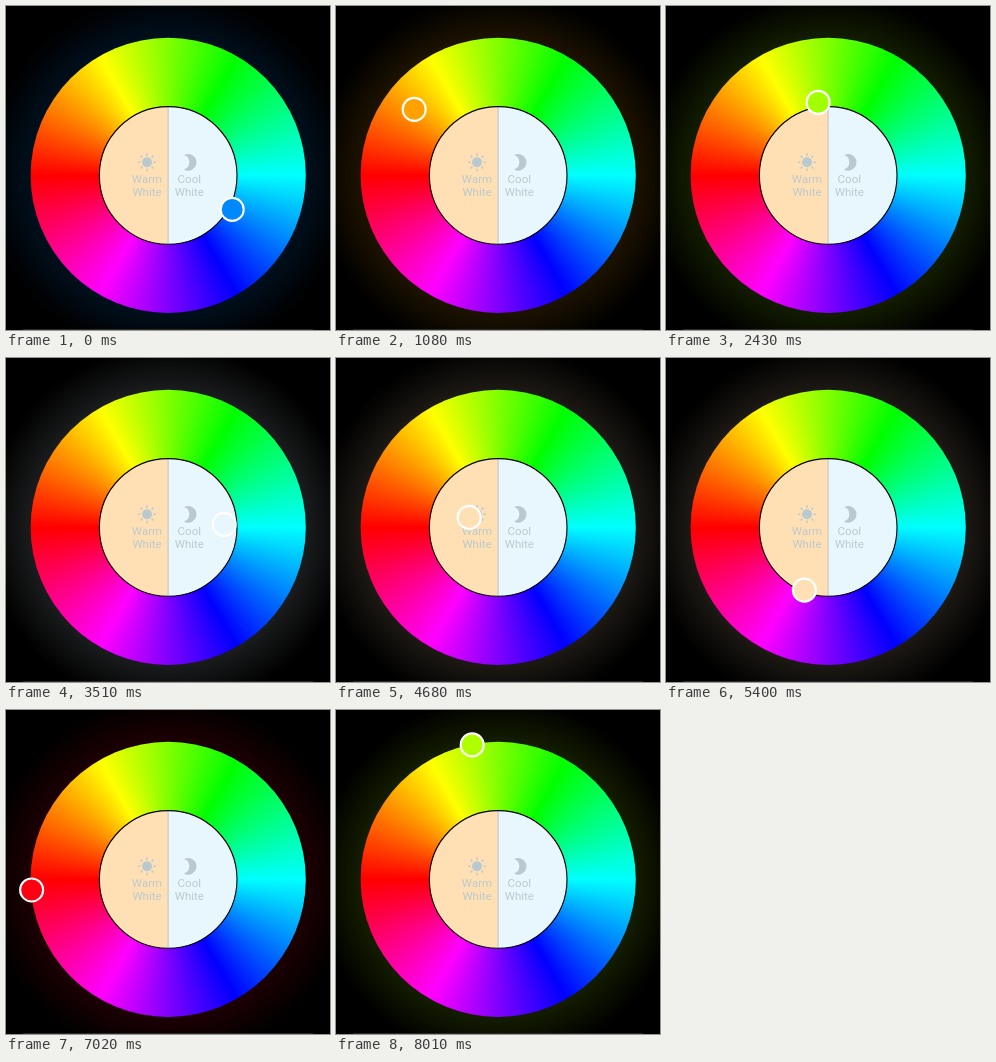
An HTML page with a canvas that plays this animation: 324 by 324 pixels, repeating every 8.1 s.

```html
<!DOCTYPE html>
<html lang="en">
<head>
<meta charset="utf-8">
<title>Colour wheel</title>
<style>
  html, body { margin: 0; width: 100%; height: 100%; overflow: hidden; background: #000; }
  canvas { display: block; width: 324px; height: 324px; }
</style>
</head>
<body>
<canvas id="stage"></canvas>
<script>
const SIZE = 324, LOOP = 8100, STEP = 90;
const CX = 162.2, CY = 169.4, OUTER = 137.6, INNER = 68.8;
const WARM = '#ffe0b4', COOL = '#e8f6fe', INK = '#bac9cf';

// Handle path: time, then offset from the wheel's centre.
const path = [
  [0, 64, 34], [360, 10, 95], [720, -85, 45], [1080, -84, -66],
  [1800, -50, -100], [2430, -10, -73], [2970, 42, -52], [3510, 56, -3],
  [4680, -29, -10], [6120, -22, 135.3], [6592, -104, 90], [7065, -137, 2],
  [7537, -106, -87], [8010, -26, -134.5]
];

const canvas = document.getElementById('stage');
const ctx = canvas.getContext('2d');
const ratio = window.devicePixelRatio || 1;
canvas.width = canvas.height = Math.round(SIZE * ratio);
ctx.scale(ratio, ratio);

function slope(i, axis) {
  const a = path[Math.max(i - 1, 0)], b = path[Math.min(i + 1, path.length - 1)];
  return (b[axis] - a[axis]) / (b[0] - a[0]);
}

function handleAt(time) {
  let i = 0;
  while (i < path.length - 2 && time >= path[i + 1][0]) i++;
  const a = path[i], b = path[i + 1];
  const span = b[0] - a[0], u = (time - a[0]) / span;
  const u2 = u * u, u3 = u2 * u;
  const [x, y] = [1, 2].map(k =>
    (2 * u3 - 3 * u2 + 1) * a[k] + (u3 - 2 * u2 + u) * span * slope(i, k) +
    (3 * u2 - 2 * u3) * b[k] + (u3 - u2) * span * slope(i + 1, k));
  const limit = Math.min(1, OUTER / Math.hypot(x, y));
  return { x: x * limit, y: y * limit };
}

function colourAt({ x, y }) {
  if (Math.hypot(x, y) < INNER) return x < 0 ? WARM : COOL;
  return `hsl(${180 + Math.atan2(y, x) * 180 / Math.PI}, 100%, 50%)`;
}

function disc(x, y, r, fill, from = 0, to = Math.PI * 2) {
  ctx.beginPath();
  ctx.arc(x, y, r, from, to);
  ctx.fillStyle = fill;
  ctx.fill();
}

function drawGlow(colour) {
  const fade = ctx.createRadialGradient(CX, CY, OUTER - 4, CX, CY, 182);
  fade.addColorStop(0, 'rgba(0,0,0,0.88)');
  fade.addColorStop(1, '#000');
  ctx.fillStyle = colour;
  ctx.fillRect(0, 0, SIZE, SIZE);
  ctx.fillStyle = fade;
  ctx.fillRect(0, 0, SIZE, SIZE);
  ctx.fillStyle = '#2c2a2a';
  ctx.fillRect(17, 323, 290, 1);
}

function drawWheel() {
  const hues = ctx.createConicGradient(0, CX, CY);
  for (let i = 0; i <= 6; i++) hues.addColorStop(i / 6, `hsl(${180 + i * 60}, 100%, 50%)`);
  disc(CX, CY, OUTER, hues);
  disc(CX, CY, INNER, COOL);
  disc(CX, CY, INNER, WARM, Math.PI / 2, Math.PI * 1.5);
  ctx.fillStyle = '#bcc3c6';
  ctx.fillRect(161.6, CY - INNER, 1, INNER * 2);
  ctx.beginPath();
  ctx.arc(CX, CY, INNER, 0, Math.PI * 2);
  ctx.lineWidth = 1.1;
  ctx.strokeStyle = '#000';
  ctx.stroke();
}

function drawSun(x, y) {
  disc(x, y, 5, INK);
  ctx.strokeStyle = INK;
  ctx.lineWidth = 1.6;
  ctx.beginPath();
  for (let i = 0; i < 8; i++) {
    const c = Math.cos(i * Math.PI / 4), s = Math.sin(i * Math.PI / 4);
    ctx.moveTo(x + c * 6.5, y + s * 6.5);
    ctx.lineTo(x + c * 8.9, y + s * 8.9);
  }
  ctx.stroke();
}

function drawMoon(x, y) {
  const outer = Math.atan2(7.2, -4.2), inner = Math.atan2(7.2, 2.1);
  ctx.beginPath();
  ctx.arc(x, y, 8.3, -outer, outer);
  ctx.arc(x - 6.3, y, 7.5, inner, -inner, true);
  ctx.fillStyle = INK;
  ctx.fill();
}

function drawLabel(word, x) {
  ctx.font = '11.5px Roboto, sans-serif';
  ctx.textAlign = 'center';
  ctx.fillStyle = INK;
  ctx.fillText(word, x, 177);
  ctx.fillText('White', x, 190);
}

function drawHandle(pos, colour) {
  disc(CX + pos.x, CY + pos.y, 11.5, colour);
  ctx.lineWidth = 2.1;
  ctx.strokeStyle = '#fff';
  ctx.stroke();
}

function draw(time) {
  const pos = handleAt(time), colour = colourAt(pos);
  drawGlow(colour);
  drawWheel();
  drawSun(141, 156.2);
  drawMoon(182.2, 156.3);
  drawLabel('Warm', 141);
  drawLabel('Cool', 183.3);
  drawHandle(pos, colour);
}

function tick() {
  draw(Math.floor((performance.now() % LOOP) / STEP) * STEP);
  requestAnimationFrame(tick);
}
tick();
</script>
</body>
</html>
```
